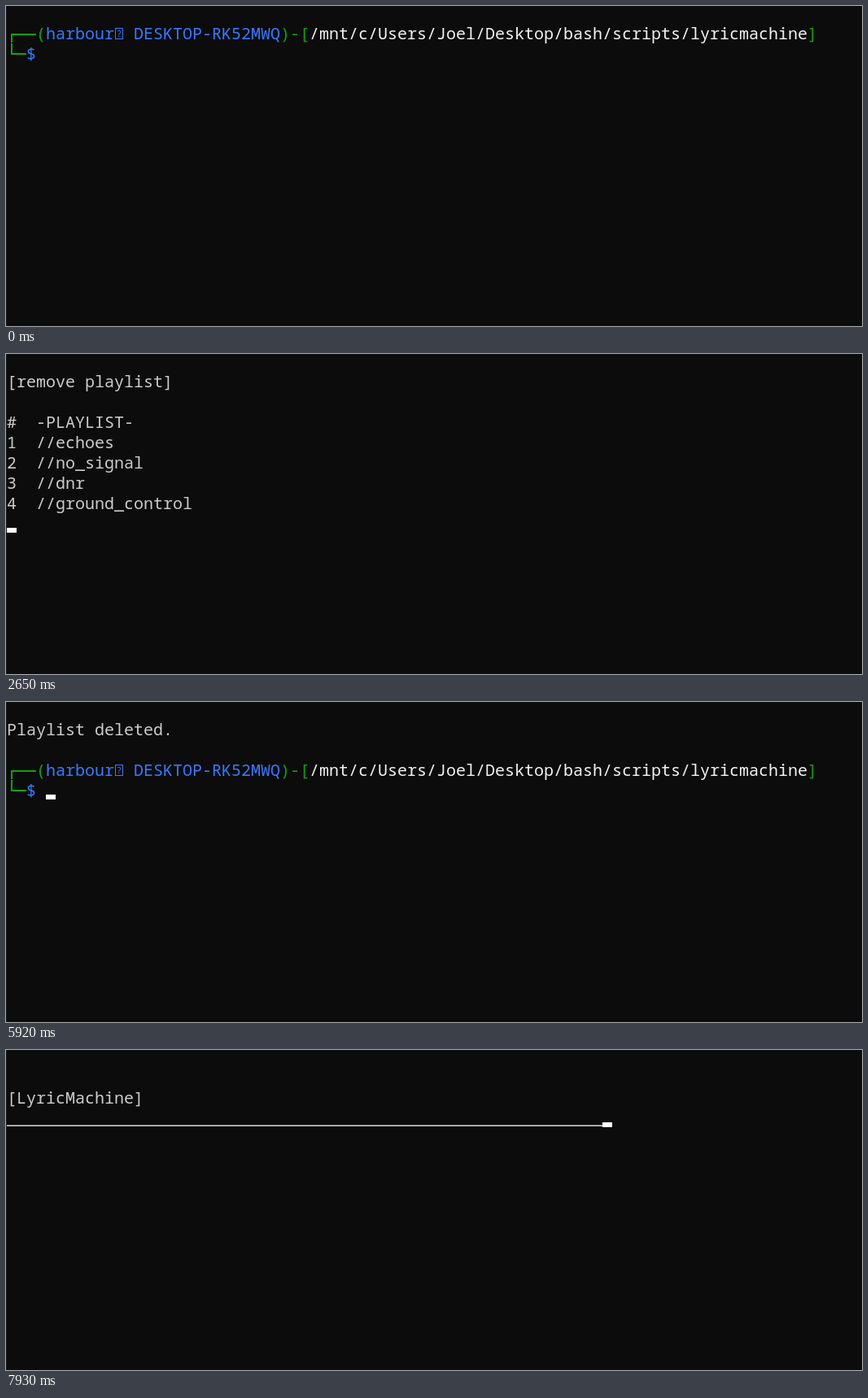
These frames come from a looping animation (1052x394 px, 8 s). An HTML page with a canvas:

```html
<!DOCTYPE html>
<html lang="en">
<head>
<meta charset="utf-8">
<title>Terminal</title>
<style>
  html, body { margin: 0; width: 100%; height: 100%; overflow: hidden; background: #0c0c0c; }
  canvas { display: block; }
</style>
</head>
<body>
<canvas id="stage" width="1052" height="394"></canvas>
<script>
const ctx = document.getElementById('stage').getContext('2d');
const LOOP = 8000, CELL = 12, LINE = 25;
const BG = '#0c0c0c', GREY = '#cccccc', WHITE = '#f2f2f2', BLUE = '#3b78ff', GREEN = '#13a10e';
const FONT = '"Noto Sans Mono", "DejaVu Sans Mono", monospace';

const USER = 'harbour', HOST = 'DESKTOP-RK52MWQ';
const PATH = '/mnt/c/Users/Joel/Desktop/bash/scripts/lyricmachine';
const PLAYLISTS = ['echoes', 'no_signal', 'dnr', 'ground_control', 'fractures', 'stealing_fire'];

const colX = col => 1 + col * CELL;
const baseline = row => row * LINE + 16;

function box(x, y, w, h, color) {
  ctx.fillStyle = color;
  ctx.fillRect(x, y, w, h);
}

function print(row, col, text, color = GREY) {
  ctx.font = `500 20px ${FONT}`;
  ctx.fillStyle = color;
  ctx.fillText(text, colX(col), baseline(row));
}

function cursor(row, col) {
  box(colX(col), row * LINE + 14, CELL, 6, '#ffffff');
}

function missingGlyph(row, col) {
  const x = colX(col), y = row * LINE;
  ctx.strokeStyle = ctx.fillStyle = BLUE;
  ctx.lineWidth = 1;
  ctx.strokeRect(x + 1.5, y + 2.5, 9, 13);
  ctx.font = `10px ${FONT}`;
  ctx.fillText('?', x + 3, y + 13);
}

function prompt(row, command = '') {
  const y = row * LINE + 9;
  box(6, y, 31, 2, GREEN);
  box(6, y, 2, 11, GREEN);
  box(6, y + 12, 2, 14, GREEN);
  box(6, y + 24, 19, 2, GREEN);
  print(row, 3, '(', GREEN);
  print(row, 4, USER, BLUE);
  missingGlyph(row, 11);
  print(row, 13, HOST, BLUE);
  print(row, 28, ')-[', GREEN);
  print(row, 31, PATH, WHITE);
  print(row, 82, ']', GREEN);
  print(row + 1, 2, '$', BLUE);
  print(row + 1, 4, command);
}

// Prompt with the cursor right after the typed command.
function typing(row, command) {
  prompt(row, command);
  cursor(row + 1, 4 + command.length);
}

function playlists(count) {
  print(1, 0, '[remove playlist]');
  print(3, 0, '#  -PLAYLIST-');
  PLAYLISTS.slice(0, count).forEach((name, i) => print(4 + i, 0, `${i + 1}  //${name}`));
}

function listing(count) {
  playlists(count);
  cursor(4 + count, 0);
}

function menu(answer, blink) {
  playlists(PLAYLISTS.length);
  print(11, 0, '0  [EXIT]');
  print(13, 0, 'Enter # (delete): ' + answer);
  if (blink) cursor(13, 18 + answer.length);
}

const deleted = () => print(1, 0, 'Playlist deleted.');

function banner(t) {
  const step = Math.min(7, Math.floor((t - 7370) / 80));
  const length = 5 + 8 * step;
  print(2, 0, '[LyricMachine]');
  print(3, 0, '_'.repeat(length));
  cursor(3, length);
}

// Each scene holds from its start time until the next one.
const SCENES = [
  [0, () => prompt(1)],
  [940, () => typing(1, '')],
  [1420, () => typing(1, 'lm')],
  [1590, () => typing(1, 'lm ')],
  [1760, () => typing(1, 'lm -')],
  [1910, () => typing(1, 'lm -r')],
  [2400, () => { prompt(1, 'lm -r'); cursor(3, 0); }],
  [2490, () => listing(0)],
  [2570, () => listing(2)],
  [2650, () => listing(4)],
  [2800, () => listing(5)],
  [2880, () => menu('', true)],
  [3540, () => menu('', false)],
  [4110, () => menu('', true)],
  [4620, () => menu('6', true)],
  [4930, () => { deleted(); cursor(2, 0); }],
  [5680, deleted],
  [5920, () => { deleted(); typing(3, ''); }],
  [6740, () => { deleted(); prompt(3); }],
  [6820, () => { deleted(); typing(3, 'l'); }],
  [6890, () => { deleted(); typing(3, 'lm'); }],
  [7300, () => { deleted(); prompt(3, 'lm'); cursor(5, 0); }],
  [7370, banner]
];

const start = performance.now();

function frame() {
  const t = (performance.now() - start) % LOOP;
  box(0, 0, 1052, 394, BG);
  box(0, 0, 1, 394, '#1c2023');
  SCENES.findLast(([from]) => from <= t)[1](t);
  requestAnimationFrame(frame);
}
frame();
</script>
</body>
</html>
```
